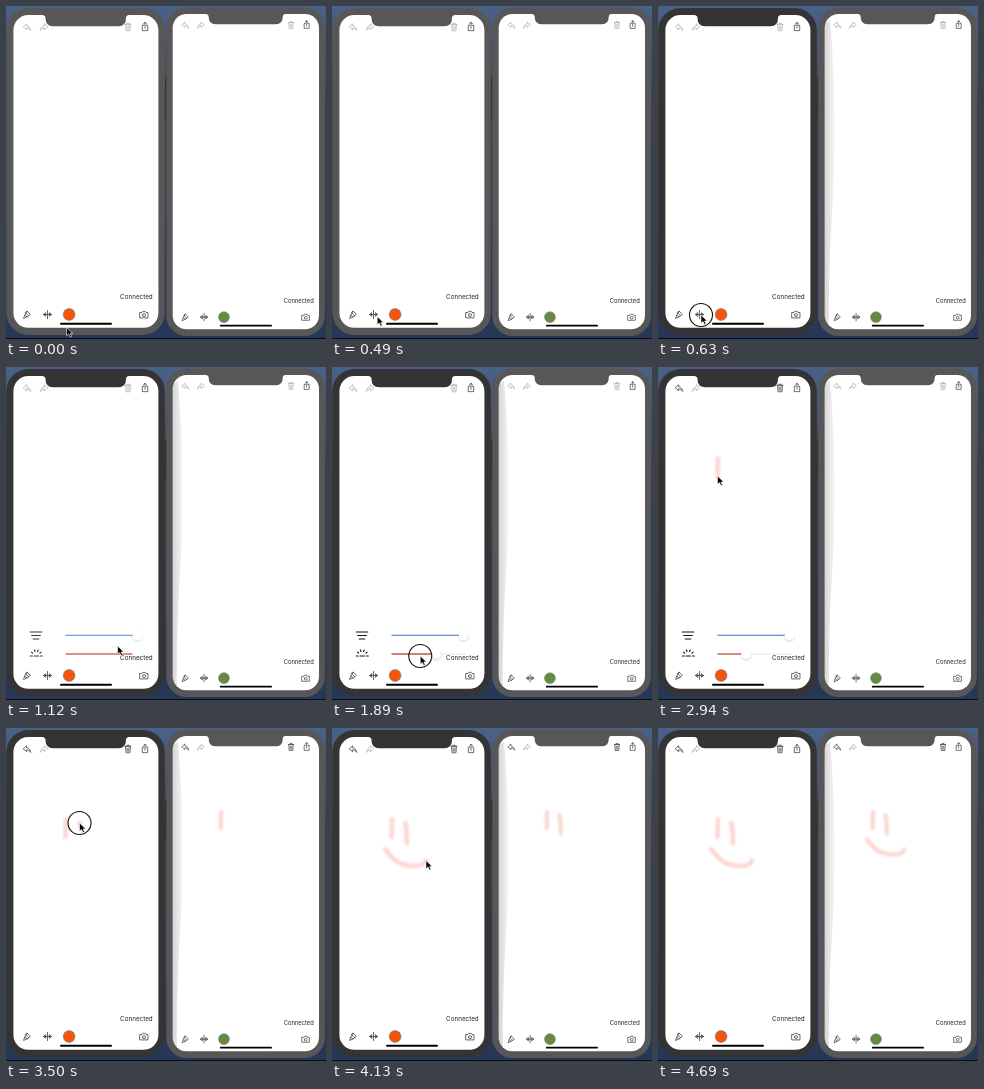
Write an HTML page that moves like this. It is 320 px wide and 333 px high and loops after 4.76 s.

```html
<!DOCTYPE html>
<html lang="en">
<head>
<meta charset="utf-8">
<title>Shared drawing on two phones</title>
<style>
html, body { margin: 0; width: 100%; height: 100%; overflow: hidden; }
svg { display: block; width: 100vw; height: 100vh; }
.icon { fill: none; stroke: #333; stroke-width: .8; stroke-linejoin: round; stroke-linecap: round; }
.off .undoable, .redo { stroke: #aaa; }
.inks { fill: none; stroke: #f7b9b0; stroke-opacity: .55; stroke-width: 4.8; stroke-linecap: round; filter: blur(1px); }
.panel .icon { stroke: #111; stroke-width: 1.15; }
.knob { fill: #fff; filter: url(#shadow); }
text { font: 6.3px Inter, "Liberation Sans", sans-serif; text-anchor: end; fill: #222; }
</style>
</head>
<body>
<svg id="stage" viewBox="0 0 320 333"></svg>
<script>
const LOOP = 4760, STEP = 70, SYNC_DELAY = 140;

// The pointer is down along each path and glides between paths.
const gesture = (from, to, d, ink = false) => ({ from, to, d, ink });
const tap = (from, to, x, y) => gesture(from, to, `M${x} ${y}h.1`);
const start = tap(0, 0, 60.5, 321.5);
const openPanel = tap(630, 770, 43, 309);
const hover = tap(1120, 1120, 111.5, 279);
const drag = gesture(1680, 1900, 'M128 286L88 289');
const leftEye = gesture(2730, 2940, 'M60 91.5L59.5 109', true);
const closePanel = tap(3290, 3360, 41, 299);
const rightEye = gesture(3500, 3710, 'M73.5 95Q75 104 75 115', true);
const smile = gesture(3920, 4130, 'M53.5 121.5C58 128 62 133 69 135.5C77 138.5 92 140 94 132.5', true);
const leave = tap(4620, 4620, 160, 318);
const gestures = [start, openPanel, hover, drag, leftEye, closePanel, rightEye, smile, leave];
const inks = gestures.filter(g => g.ink);

const ARROW = 'M4 3.4Q3.2-1.2-.4-1.4V-3.6L-4.2-.2L-.4 3V.9Q2.6 .9 4 3.4Z';
const TRASH = 'M-3.3-3H3.3M-1.3-3V-4.2H1.3V-3M-2.7-3L-2.2 4.2H2.2L2.7-3M-.9-1.2V2.6M.9-1.2V2.6';
const SHARE = 'M-1.4-1.4H-3V4.6H3V-1.4H1.4M0 2V-4.6M-1.7-3L0-4.7L1.7-3';
const BRUSH = 'M.2-3.8L3.8-.4L1.8 1.2L-1.6-2.2ZL-2.6 .6L.2 2.4L1.8 1.2M-2.6 .6L-3.8 4.2L.2 2.4';
const MOVE = 'M0-4.6V4.6M-4.4 0H4.4M-2.4-1.8L-4.6 0L-2.4 1.8ZM2.4-1.8L4.6 0L2.4 1.8Z';
const CAMERA = 'M-4.4-2.2H-2.2L-1.4-3.5H1.4L2.2-2.2H4.4V3.8H-4.4ZM-1.7 .7a1.7 1.7 0 1 0 3.4 0a1.7 1.7 0 1 0-3.4 0';
const LINES = 'M-5.8-3.5H5.8M-4.4 0H4.4M-2.8 3.5H2.8';
const SUNRISE = 'M-6 3H-4M-2.2 3H2.2M4 3H6M-4.8-.9L-3.6 .2M-1.9-3L-1.3-1.6M1.9-3L1.3-1.6M4.8-.9L3.6 .2';

const icon = (x, y, d, cls = '', size = .9, flip = 1) =>
  `<path class="icon ${cls}" transform="translate(${x} ${y}) scale(${size * flip} ${size})" d="${d}"/>`;

// dx and dy are the extra screen width and height over the smaller phone.
const phone = (id, place, dx, dy, paint) => `
  <g id="${id}" transform="${place}" fill="#575757">
    <rect class="bezel" x=".4" y="2" width="${158.4 + dx}" height="${327 + dy}" rx="22"/>
    <rect x="7.4" y="9" width="${145 + dx}" height="${312.8 + dy}" rx="15" fill="#fff"/>
    <path class="bezel" transform="translate(${dx / 2})"
      d="M36 8V9Q39.5 9.3 39.5 12Q39.5 20.2 47 20.2H112.5Q120 20.2 120 12Q120 9.3 123 9V8Z"/>
    ${icon(21, 21, ARROW, 'undoable')}${icon(38, 21, ARROW, 'redo', .9, -1)}
    ${icon(122 + dx, 21, TRASH, 'undoable')}${icon(139 + dx, 20.5, SHARE)}
    <g class="inks">${inks.map(g => `<path pathLength="1" d="${g.d}"/>`).join('')}</g>
    <g class="panel"></g>
    ${icon(21, 308.7 + dy, BRUSH)}${icon(41.5, 308.5 + dy, MOVE)}${icon(138 + dx, 308.5 + dy, CAMERA)}
    <circle cx="63.1" cy="${308.5 + dy}" r="5.9" fill="${paint}" stroke="#777" stroke-width=".6"/>
    <rect x="${54 + dx / 3}" y="${316.8 + dy}" width="${52 + dx / 3}" height="2" rx="1" fill="#000"/>
    <text x="${146.7 + dx}" y="${293.2 + dy}">Connected</text>
  </g>`;

const stage = document.getElementById('stage');
stage.innerHTML = `
  <defs>
    <linearGradient id="wall" x2="0" y2="1"><stop stop-color="#4a6288"/><stop offset=".3" stop-color="#3a4352"/><stop offset="1" stop-color="#263757"/></linearGradient>
    <linearGradient id="dim" gradientUnits="userSpaceOnUse" x1="160" x2="178"><stop stop-opacity=".24"/><stop offset=".75" stop-opacity=".08"/><stop offset="1" stop-opacity="0"/></linearGradient>
    <filter id="shadow" x="-1" y="-1" width="3" height="3"><feDropShadow dx="0" dy="1" stdDeviation="1" flood-opacity=".22"/></filter>
  </defs>
  <rect width="320" height="333" fill="url(#wall)"/>
  <rect y="332" width="320" height="1" fill="#0a0d14"/>
  <rect x="159" y="72" width="3" height="40" rx="1" fill="#30333a"/>
  ${phone('left', '', 0, 0, '#f2560d')}
  ${phone('right', 'translate(159.9 -.3) scale(.92)', 14, 30, '#658a42')}
  <path id="shade" fill="url(#dim)" d="M167 18L172 13Q180 110 175 190T171 322L167 315Z"/>
  <g id="pointer">
    <circle id="ring" r="11.5" fill="none" stroke="#111" stroke-width="1.1"/>
    <path d="M0 0V8.2L2 6.4L3.5 9.6L5 8.9L3.6 5.9H6.2Z" fill="#000" stroke="#fff" stroke-width=".6"/>
  </g>`;

const $ = selector => stage.querySelector(selector);
const panel = $('#left .panel');
panel.innerHTML = `
  ${icon(30, 268.5, LINES, '', 1)}${icon(30.3, 286, SUNRISE, '', 1)}
  <path d="M59.5 268.3H134M59.5 287H134" stroke="#e6e6e6"/>
  <path d="M59.5 268.3H131" stroke="#5c8edb" stroke-width="1.3"/>
  <path id="spray" stroke="#c4584d" stroke-width="1.3"/>
  <circle class="knob" cx="131.5" cy="268.5" r="4.7"/>
  <circle id="sprayKnob" class="knob" cy="287" r="4.7"/>`;

for (const g of gestures) {
  g.path = document.createElementNS('http://www.w3.org/2000/svg', 'path');
  g.path.setAttribute('d', g.d);
  g.at = p => g.path.getPointAtLength(p * g.path.getTotalLength());
}

const ramp = (t, from, to) => Math.min(1, Math.max(0, (t - from) / (to - from || 1)));
const smooth = p => p * p * (3 - 2 * p);
const mix = (a, b, p) => a + (b - a) * p;
const show = (element, visible) => { element.style.display = visible ? '' : 'none'; };

function pointerAt(t) {
  const i = gestures.findLastIndex(g => g.from <= t);
  const now = gestures[i], next = gestures[i + 1];
  if (t < now.to || !next) return now.at(smooth(ramp(t, now.from, now.to)));
  const a = now.at(1), b = next.at(0), p = smooth(ramp(t, now.to, next.from));
  return { x: mix(a.x, b.x, p), y: mix(a.y, b.y, p) };
}

function drawInk(id, progress) {
  const paths = stage.querySelectorAll(`#${id} .inks path`);
  inks.forEach((g, i) => {
    const p = progress(g);
    show(paths[i], p > 0);
    paths[i].setAttribute('stroke-dasharray', `${p} 2`);
  });
  $('#' + id).classList.toggle('off', progress(inks[0]) <= 0);
}

function render(t) {
  const active = t >= openPanel.from;
  for (const part of stage.querySelectorAll('#left .bezel')) part.style.fill = active ? '#343434' : '';
  show($('#shade'), active);

  drawInk('left', g => smooth(ramp(t + STEP / 2, g.from, g.to)));
  drawInk('right', g => +(t >= g.to + SYNC_DELAY));

  // The knob trails the finger slightly.
  const x = mix(131, 88, smooth(ramp(t, drag.from, drag.to + SYNC_DELAY)));
  panel.style.opacity = ramp(t, openPanel.to, 1190) * (1 - ramp(t, closePanel.from, 3430));
  $('#spray').setAttribute('d', `M59.5 287H${x}`);
  $('#sprayKnob').setAttribute('cx', x);

  const tip = pointerAt(t);
  $('#pointer').setAttribute('transform', `translate(${tip.x} ${tip.y})`);
  show($('#pointer'), t <= leave.to);
  show($('#ring'), gestures.some(g => t >= g.from && t < g.to));
}

function tick() {
  render(Math.floor(performance.now() % LOOP / STEP) * STEP);
  requestAnimationFrame(tick);
}
tick();
</script>
</body>
</html>
```
